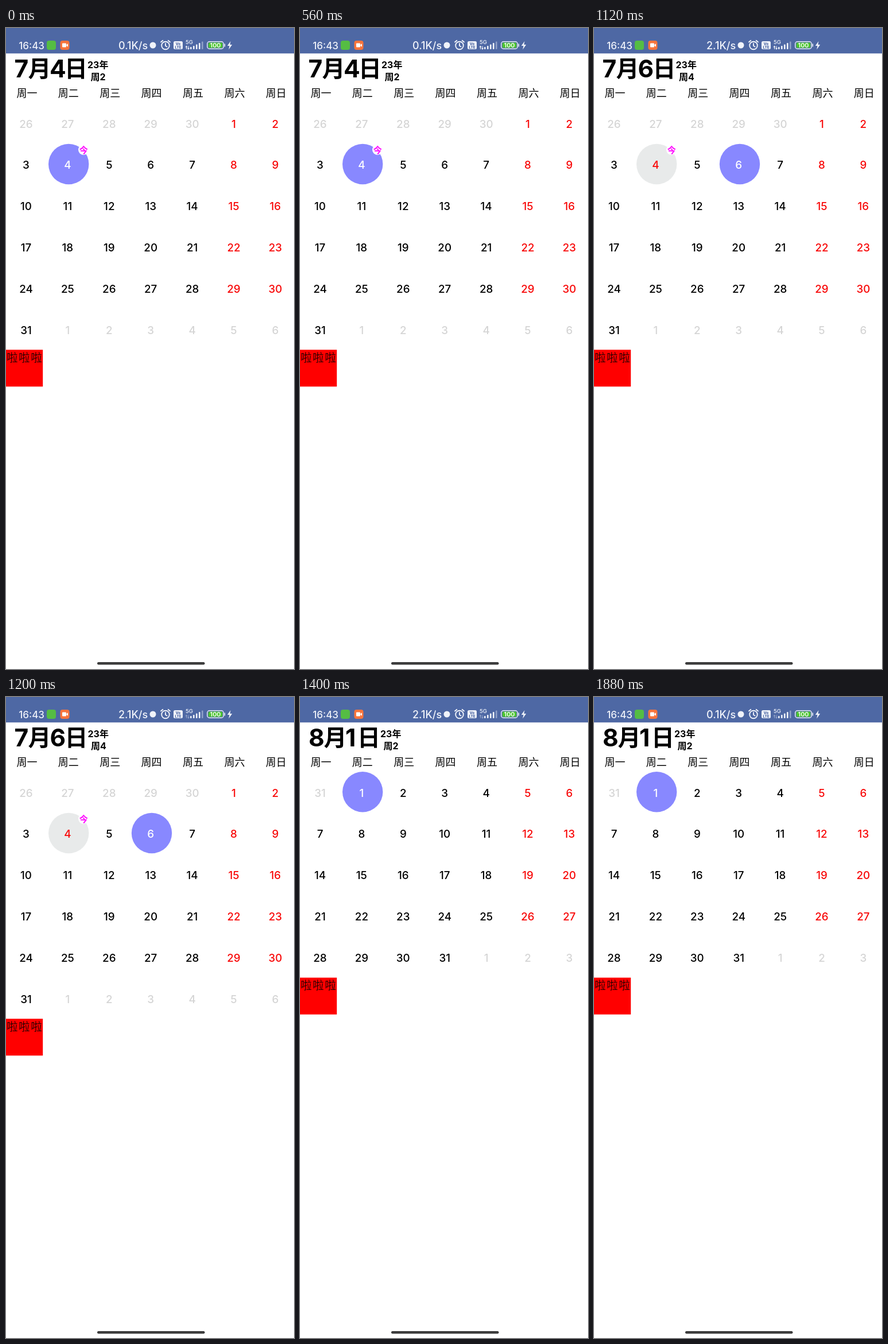
An HTML page for the animation above (1920 ms loop, 502x1116 px).

```html
<!DOCTYPE html>
<html lang="zh-CN">
<head>
<meta charset="utf-8">
<style>
html, body { margin: 0; width: 100%; height: 100%; overflow: hidden; background: #fff; }
svg { display: block; width: 100%; height: 100%; }
text { font-family: Inter, "Noto Sans CJK SC", "Noto Sans CJK", sans-serif; font-weight: 500; }
.mid { text-anchor: middle; }
.num { font-size: 42.5px; font-weight: 700; }
.han { font-size: 40px; font-weight: 700; }
.sub { font-size: 16px; font-weight: 700; }
.bar { fill: #f0f3fa; }
</style>
</head>
<body>
<svg id="stage" viewBox="0 0 502 1116">
  <rect width="502" height="1116" fill="#fff"/>
  <g id="pages"></g>
  <g id="box">
    <rect width="64.2" height="64.1" fill="#f00"/>
    <text x="1" y="20.8" font-size="19.5" letter-spacing="1.6" style="font-weight:400" fill="#300">啦啦啦</text>
  </g>
  <g id="week"></g>
  <g id="head"></g>
  <rect width="502" height="44.3" fill="#4e68a4"/>
  <text class="bar" x="22.3" y="36.5" font-size="17">16:43</text>
  <rect x="71" y="22" width="16" height="16" rx="4" fill="#55bd43"/>
  <rect x="94.5" y="22" width="16" height="16" rx="4" fill="#f9743c"/>
  <path d="M98 27.5q0-1 1-1h5q1 0 1 1v5q0 1-1 1h-5q-1 0-1-1zM105.5 29l2.500-1.700v5.400l-2.500-1.700z" fill="#fff"/>
  <text class="bar" id="speed" x="196" y="36.5" font-size="18"></text>
  <circle cx="256" cy="30" r="5.5" fill="#f0f3fa"/>
  <g fill="none" stroke="#f0f3fa" stroke-width="1.9" stroke-linecap="round" stroke-linejoin="round">
    <circle cx="278" cy="30.5" r="6.8"/>
    <path d="M278 27v4l2.500 1.500M270 24.500l3.300-2.700M286 24.500l-3.300-2.700"/>
  </g>
  <rect x="292" y="23" width="16" height="14" rx="2.5" fill="#f0f3fa"/>
  <g fill="#4e68a4" font-size="6.3">
    <text class="mid" x="300" y="29.5" style="font-weight:800">Vo</text>
    <text class="mid" x="300" y="35.7" style="font-weight:800">LTE</text>
  </g>
  <text x="313" y="28" font-size="9.5" fill="#f0f3fa">5G</text>
  <path id="arrows" d="M314.500 37v-5M313 33.500l1.500-2 1.500 2M318 31.500v5M316.500 35l1.500 2 1.500-2" fill="none" stroke="#f0f3fa" stroke-width="1.1"/>
  <g id="signal" fill="#f0f3fa"></g>
  <rect x="350.8" y="23.8" width="28.4" height="12.4" rx="3.8" fill="none" stroke="#e6ecf5" stroke-width="1.5"/>
  <rect x="352.8" y="25.5" width="24.4" height="9" rx="2" fill="#4cc52f"/>
  <path d="M381.300 28v4" stroke="#e6ecf5" stroke-width="1.6" stroke-linecap="round"/>
  <text class="mid" x="365" y="34" font-size="10.8" style="font-weight:600" fill="#fff">100</text>
  <path d="M391.500 23l-5.700 8h3.700l-1.300 6.500 6-8.500h-3.800z" fill="#f0f3fa"/>
  <rect x="159" y="1104" width="187.5" height="4.5" rx="2.2" fill="#3c3c3c"/>
</svg>
<script>
const NS = "http://www.w3.org/2000/svg";
const $ = id => document.getElementById(id);
const W = 502, COL = 72.4, ROW = 71.8, LOOP = 1920, STEP = 40;
const BLUE = "#8888ff", RED = "#f80808";

function add(parent, tag, attrs, label) {
  const el = document.createElementNS(NS, tag);
  for (const k in attrs) el.setAttribute(k, attrs[k]);
  if (label !== undefined) el.textContent = label;
  parent.appendChild(el);
  return el;
}

function disc(page, col, row) {
  return add(page, "circle", { cx: 36.8 + col * COL, cy: 165.2 + row * ROW, r: 35.2, fill: BLUE });
}

// first: date of the top-left Monday; prev, days: lengths of the two months
function fillDates(page, first, prev, days, rows) {
  const cells = [];
  for (let i = 0; i < rows * 7; i++) {
    const col = i % 7, row = Math.floor(i / 7);
    const n = first + i - prev;
    const inside = n >= 1 && n <= days;
    const day = n < 1 ? n + prev : inside ? n : n - days;
    const fill = col > 4 && (inside || n < 1) ? RED : inside ? "#000" : "#d5d5d5";
    cells.push(add(page, "text", {
      class: "mid", x: 35 + col * COL, y: 173.6 + row * ROW, "font-size": 18.8, fill
    }, day));
  }
  return cells;
}

const july = add($("pages"), "g", {});
const today = disc(july, 1, 1);
const picked = disc(july, 3, 1);
add(july, "circle", { cx: 135, cy: 212, r: 9, fill: "#fff" });
add(july, "text", { class: "mid", x: 135.2, y: 217.6, "font-size": 15, fill: "#f0f", style: "font-weight:700" }, "今");
const dates = fillDates(july, 26, 30, 31, 6);

const august = add($("pages"), "g", {});
disc(august, 1, 0);
fillDates(august, 31, 31, 31, 5)[1].setAttribute("fill", "#fff");

[..."一二三四五六日"].forEach((d, i) =>
  add($("week"), "text", { class: "mid", x: 36.4 + i * COL, y: 119.8, "font-size": 18 }, "周" + d));

[4, 6, 8.5, 11, 13.5].forEach((h, i) =>
  add($("signal"), "rect", { x: 321 + i * 5, y: 37 - h, width: 2.6, height: h, rx: 1, opacity: i > 3 ? 0.4 : 1 }));

function heading(month, day, weekday, xs, subX) {
  const g = add($("head"), "g", {});
  [month, "月", day, "日"].forEach((s, i) =>
    add(g, "text", { class: i % 2 ? "han" : "num", x: xs[i], y: i % 2 ? 85.3 : 86.3 }, s));
  add(g, "text", { class: "sub", x: subX, y: 70.3 }, "23年");
  add(g, "text", { class: "sub", x: subX + 5.5, y: 91.2 }, "周" + weekday);
  return g;
}
const heads = [
  heading(7, 4, 2, [14.5, 38.5, 76, 102], 142),
  heading(7, 6, 4, [14.5, 38.5, 76.5, 102.5], 142.5),
  heading(8, 1, 2, [15, 41.5, 79, 100], 140)
];

const show = (el, on) => el.setAttribute("visibility", on ? "visible" : "hidden");
const move = (el, x, y) => el.setAttribute("transform", `translate(${x} ${y})`);

function draw(ms) {
  const t = Math.floor(ms / STEP) * STEP;
  const tapped = t >= 920;
  const p = Math.pow(Math.min(1, Math.max(0, (t - 1280) / 120)), 1.35);

  today.setAttribute("fill", tapped ? "#e8eaea" : BLUE);
  show(picked, tapped);
  dates[8].setAttribute("fill", tapped ? RED : "#fff");
  dates[10].setAttribute("fill", tapped ? "#fff" : "#000");

  move(july, -W * p, 0);
  move(august, W * (1 - p), 0);
  move($("box"), 0, 560.2 - 71.6 * p);

  const current = p > 0.5 ? 2 : tapped ? 1 : 0;
  heads.forEach((h, i) => show(h, i === current));

  $("speed").textContent = tapped && t < 1640 ? "2.1K/s" : "0.1K/s";
  const busy = t < 160 || (t >= 480 && t < 1200);
  $("arrows").setAttribute("opacity", busy ? 1 : 0.4);
}

function tick() {
  draw(performance.now() % LOOP);
  requestAnimationFrame(tick);
}
tick();
</script>
</body>
</html>
```
